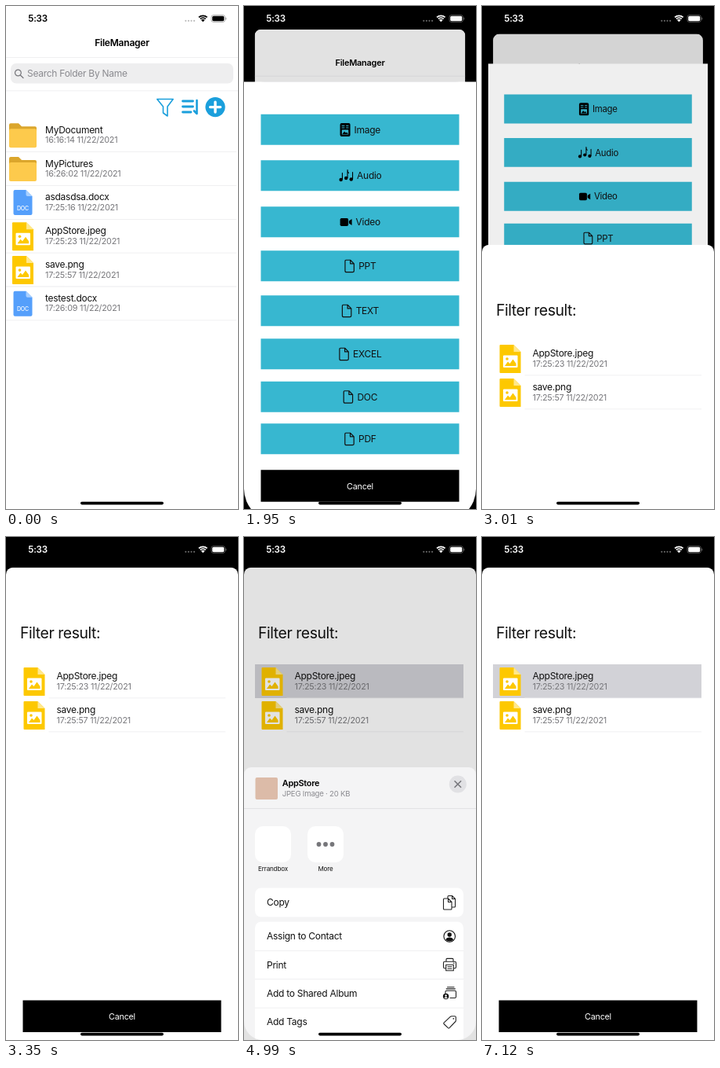
Animation, 296 px wide and 640 px high, one loop 8000 ms. Source, as an HTML page with a canvas:

```html
<!DOCTYPE html>
<html lang="en">
<head>
<meta charset="utf-8">
<title>File manager</title>
<style>
html, body { margin: 0; width: 100%; height: 100%; overflow: hidden; background: #000; }
canvas { display: block; width: 296px; height: 640px; }
</style>
</head>
<body>
<canvas id="stage"></canvas>
<script>
const W = 296, H = 640, LOOP = 8000;
const canvas = document.getElementById('stage');
const dpr = window.devicePixelRatio || 1;
canvas.width = W * dpr;
canvas.height = H * dpr;
const c = canvas.getContext('2d');

// The screen refreshes only at these moments (ms).
const TICKS = [0, 120, 660, 770, 1010, 1130, 1500, 1630, 1750, 1850, 1950, 2050, 2160,
  3010, 3130, 3250, 3350, 4340, 4640, 4760, 4880, 4990, 6680, 6790, 6900, 7010, 7120];
const SCALE = 0.905, SHEET_TOP = 38.7, STACK_TOP = 30.5, SHEET_H = 602, DIM = 0.115;
const INK = '#111', GRAY = '#77777b', BLUE = '#1b9fdc', TEAL = '#37b7d0', LINE = '#ebebed';

const mix = (a, b, p) => a + (b - a) * p;
const ramp = (t, a, b) => Math.min(1, Math.max(0, (t - a) / (b - a)));

// Critically damped spring from 0 to 1.
function spring(t, start) {
  const k = Math.max(0, t - start) * 0.018;
  const p = 1 - (1 + k) * Math.exp(-k);
  return p > 0.995 ? 1 : p;
}

function text(s, x, y, size, color = INK, weight = 400, align = 'left') {
  c.font = `${weight} ${size}px Inter, "Liberation Sans", sans-serif`;
  c.letterSpacing = `${-0.0225 * size}px`;
  c.textAlign = align;
  c.fillStyle = color;
  c.fillText(s, x, y);
}

function box(x, y, w, h, color, r = 0) {
  c.fillStyle = color;
  c.beginPath();
  c.roundRect(x, y, w, h, r);
  c.fill();
}

function disc(x, y, r, color) {
  c.fillStyle = color;
  c.beginPath();
  c.arc(x, y, r, 0, 7);
  c.fill();
}

function at(x, y, draw) {
  c.save();
  c.translate(x, y);
  draw();
  c.restore();
}

function fill(d, color) {
  c.fillStyle = color;
  c.fill(new Path2D(d));
}

function stroke(d, color, width = 1) {
  c.strokeStyle = color;
  c.lineWidth = width;
  c.lineCap = c.lineJoin = 'round';
  c.stroke(new Path2D(d));
}

// ---- file list ----

function folder() {
  fill('M0 3Q0 1 2 1H12L16 5H33Q35 5 35 7V30H0Z', '#dba62c');
  box(0, 8, 35, 24, '#fdca4c', 2);
}

function docFile() {
  fill('M2 0H16L24 8V30Q24 32 22 32H2Q0 32 0 30V2Q0 0 2 0Z', '#559ffb');
  fill('M16 0L24 8H18Q16 8 16 6Z', '#a9d0ff');
  text('DOC', 12, 25.5, 7, '#fff', 500, 'center');
}

function imageFile() {
  fill('M1 0H18L27 9V36H1Q0 36 0 35V1Q0 0 1 0Z', '#fdc800');
  fill('M18 0L27 9H18Z', '#ffe88c');
  box(4.5, 13.5, 18.5, 15.5, '#fff', 1);
  disc(9.5, 18, 1.8, '#fdc800');
  fill('M6.5 27L10.5 21.5L13 24L17 18.5L21 24V27Z', '#fdc800');
}

const ICONS = { dir: [folder, 4, 5.5], doc: [docFile, 9.5, 5.7], img: [imageFile, 8, 4] };

function row(x, y, kind, name, stamp, right, lineX) {
  const [icon, ix, iy] = ICONS[kind];
  at(x, y, () => {
    at(ix, iy, icon);
    text(name, 50, 19, 12);
    text(stamp, 50, 31.5, 10.8, GRAY);
    box(lineX, 42.5, right - x - lineX, 0.8, LINE);
  });
}

const FILES = [
  ['dir', 'MyDocument', '16:16:14 11/22/2021'],
  ['dir', 'MyPictures', '16:26:02 11/22/2021'],
  ['doc', 'asdasdsa.docx', '17:25:16 11/22/2021'],
  ['img', 'AppStore.jpeg', '17:25:23 11/22/2021'],
  ['img', 'save.png', '17:25:57 11/22/2021'],
  ['doc', 'testest.docx', '17:26:09 11/22/2021']
];

function home(caret) {
  text('FileManager', 148, 51.3, 12.1, '#000', 600, 'center');
  box(0, 65, W, 0.8, LINE);
  box(6, 73, 284, 25.5, '#eeeeef', 7);
  stroke('M19.3 85A3.9 3.9 0 1 1 11.5 85A3.9 3.9 0 1 1 19.3 85M18.3 88L22 91.5', '#77777c', 1.2);
  text('Search Folder By Name', 27, 90.2, 12, '#8a8a8f');
  c.globalAlpha = caret;
  box(27, 78, 2, 16, '#3f74f2', 1);
  c.globalAlpha = 1;
  box(0, 107.5, W, 0.8, LINE);
  stroke('M192.8 118.5H213.2L206 128V140L200.5 136V128Z', BLUE, 1.6);
  stroke('M225.5 121H238.5M225.5 128H238.5M225.5 135H236', BLUE, 2.8);
  stroke('M243.5 120V137L240 133.5', BLUE, 2.6);
  disc(267, 128.6, 12.6, BLUE);
  stroke('M260.5 128.6H273.5M267 122.1V135.1', '#fff', 3.4);
  FILES.forEach((f, i) => row(0, 142.7 + 42.85 * i, ...f, 294, 0));
}

// ---- type menu ----

function pictureGlyph() {
  box(0, 0, 13, 17, '#000', 2);
  stroke('M2.5 3.5H5.5M2.5 6H5.5M8 3.5H10.5M8 6H10.5', TEAL, 1);
  box(2.3, 8.5, 8.4, 6, TEAL, 0.5);
  fill('M2.8 14L5.5 10.5L7.5 12.5L8.7 11.5L10.3 14Z', '#000');
}

function notesGlyph() {
  stroke('M4.4 13V5M11 11V1Q11 4 12.5 5M17.5 12.5V4', '#000', 1.1);
  for (const [x, y] of [[2.6, 13.5], [9.2, 11.5], [15.7, 13]]) disc(x, y, 2.2, '#000');
}

function cameraGlyph() {
  box(0, 3.5, 10.5, 10, '#000', 1.8);
  fill('M11.3 7L15 4.5V12.5L11.3 10Z', '#000');
}

function pageGlyph() {
  stroke('M2 .8H7.5L12.2 5.5V14.5Q12.2 16.2 10.5 16.2H2.5Q.8 16.2 .8 14.5V2.5Q.8 .8 2 .8ZM7.5 .8V5.5H12.2', '#111', 1.2);
}

const MENU = [
  ['Image', 137.5, pictureGlyph, 13], ['Audio', 196, notesGlyph, 18],
  ['Video', 255, cameraGlyph, 15], ['PPT', 311, pageGlyph, 13],
  ['TEXT', 368, pageGlyph, 13], ['EXCEL', 423, pageGlyph, 13],
  ['DOC', 477.5, pageGlyph, 13], ['PDF', 531, pageGlyph, 13]
];

function cancelButton(y) {
  box(21.5, y, 253, 40.5, '#000');
  text('Cancel', 148, y + 24.6, 10.8, '#fff', 400, 'center');
}

function menu(off, p) {
  const s = mix(1, SCALE, p);
  c.save();
  c.translate(W / 2 * (1 - s), mix(SHEET_TOP, STACK_TOP, p) + off);
  c.scale(s, s);
  c.translate(0, -SHEET_TOP);
  const r = off > 1 ? 42 : 0;
  c.beginPath();
  c.roundRect(0, 80, W, H - 80, [0, 0, r, r]);
  c.clip();
  box(0, 80, W, H, '#fff');
  c.translate(0, -16);
  for (const [label, y, glyph, gw] of MENU) {
    box(21.5, y, 253, 39, TEAL);
    c.font = '400 12px Inter, "Liberation Sans", sans-serif';
    c.letterSpacing = '-0.27px';
    const x = 148.3 - (gw + 5 + c.measureText(label).width) / 2;
    at(x, y + 11.3, glyph);
    text(label, x + gw + 5, y + 24, 12);
  }
  cancelButton(590);
  box(0, 0, W, H + 20, `rgba(0,0,0,${DIM * p})`);
  c.restore();
}

// ---- results ----

function results(off, picked, dim) {
  c.save();
  c.translate(0, off);
  c.beginPath();
  c.roundRect(0, SHEET_TOP, W, H, [9, 9, 0, 0]);
  c.clip();
  box(0, SHEET_TOP, W, H, '#fff');
  text('Filter result:', 18, 129, 19.4);
  if (picked) box(14, 162, 266, 43, '#d2d2d7');
  row(14.5, 162, ...FILES[3], 280, 40);
  row(14.5, 205, ...FILES[4], 280, 40);
  cancelButton(589.5);
  box(0, 0, W, H, `rgba(0,0,0,${DIM * dim})`);
  c.restore();
}

// ---- share sheet ----

const copyGlyph = () => stroke('M6 3.5V1.5Q6 .5 7 .5H11.5L15.5 4.5V14Q15.5 15 14.5 15H11.5M11.5 .5V4.5H15.5' +
  'M1.5 4H6.5L11 8.5V17Q11 18 10 18H1.5Q.5 18 .5 17V5Q.5 4 1.5 4ZM6.5 4V8.5H11', '#222', 1.1);

function contactGlyph() {
  stroke('M15.5 9A7.3 7.3 0 1 1 .9 9A7.3 7.3 0 1 1 15.5 9', '#111', 1.1);
  disc(8.2, 7, 2.7, '#111');
  fill('M3.3 13.5Q4 10.5 8.2 10.5Q12.4 10.5 13.1 13.5Q8.2 17.5 3.3 13.5Z', '#111');
}

function printGlyph() {
  stroke('M4 5V2.2Q4 1.2 5 1.2H12Q13 1.2 13 2.2V5M3.5 13.5H2Q.5 13.5 .5 12V6.5Q.5 5 2 5H15Q16.5 5 16.5 6.5V12Q16.5 13.5 15 13.5H13.5' +
    'M3.7 9H13.3V16.5H3.7ZM6 11.5H11M6 14H11', '#222', 1.1);
  disc(13.8, 7, 0.8, '#222');
}

function albumGlyph() {
  stroke('M5.5 1.2H14M4.2 3.4H15.3M3 9V7.2Q3 5.8 4.4 5.8H15Q16.5 5.8 16.5 7.2V13.5Q16.5 15 15 15H9', '#222', 1.1);
  disc(3.6, 13, 3.7, '#111');
  disc(3.6, 12, 1.2, '#fff');
  fill('M1.4 15Q3.6 12.5 5.8 15Q3.6 16.7 1.4 15Z', '#fff');
}

function tagGlyph() {
  stroke('M1 10.2L9.5 2.2Q10 1.8 10.8 1.8H15Q16.3 1.8 16.3 3V7.2Q16.3 8 15.8 8.5L8 16.6Q7.2 17.3 6.4 16.6L1 11.5Q.4 10.8 1 10.2Z', '#222', 1.1);
  disc(13.3, 4.8, 0.9, '#222');
}

const ACTIONS = [
  ['Copy', 465, copyGlyph], ['Assign to Contact', 508, contactGlyph], ['Print', 544.2, printGlyph],
  ['Add to Shared Album', 580.5, albumGlyph], ['Add Tags', 617, tagGlyph]
];

function share(off) {
  c.save();
  c.translate(0, off);
  c.beginPath();
  c.roundRect(0, 293, W, H - 293, [9, 9, 24, 24]);
  c.clip();
  box(0, 293, W, H, '#f4f4f5');
  box(14.5, 306, 28.5, 28, '#dcbba8', 2);
  text('AppStore', 48.7, 316.8, 10.9, '#000', 600);
  text('JPEG Image · 20 KB', 48.7, 330, 9.6, '#8b8b90');
  disc(272.8, 314.5, 11, '#e1e1e4');
  stroke('M269 310.7L276.6 318.3M276.6 310.7L269 318.3', '#77777c', 1.6);
  box(0, 345, W, 0.8, '#dcdcdf');
  box(14, 368, 46, 46, '#fff', 10);
  box(81, 368, 46, 46, '#fff', 10);
  for (let i = -1; i < 2; i++) disc(104 + 8.5 * i, 391, 2.9, '#76767a');
  text('Errandbox', 37, 425, 8.1, INK, 400, 'center');
  text('More', 104, 425, 8.1, INK, 400, 'center');
  box(14, 446.5, 266, 37, '#fff', 8);
  box(14, 489.5, 266, 170, '#fff', 8);
  ACTIONS.forEach(([label, y, glyph], i) => {
    text(label, 29, y + 4.3, 12);
    at(254, y - 9, glyph);
    if (i > 1) box(14, y - 18.3, 266, 0.8, LINE);
  });
  c.restore();
}

// ---- system overlay ----

function statusBar(p) {
  const v = Math.round(255 * p), ink = `rgb(${v},${v},${v})`;
  text('5:33', 28.3, 20.3, 11.6, ink, 600);
  for (let i = 0; i < 4; i++) disc(229.3 + 3.6 * i, 18.8, 1.1, p > 0.5 ? '#666' : '#bbb');
  c.strokeStyle = ink;
  c.lineCap = 'butt';
  c.lineWidth = 1.7;
  for (const r of [7.7, 5]) {
    c.beginPath();
    c.arc(251.3, 20, r, -2.33, -0.81);
    c.stroke();
  }
  fill('M251.3 20.3L248.9 17.7Q251.3 15.9 253.7 17.7Z', ink);
  c.globalAlpha = 0.4;
  c.lineWidth = 0.8;
  c.beginPath();
  c.roundRect(262, 11.6, 17.4, 8.8, 2.6);
  c.stroke();
  box(280.3, 14.5, 1, 3, ink, 0.5);
  c.globalAlpha = 1;
  box(263.2, 12.8, 15, 6.4, ink, 1.6);
}

function draw(t) {
  const p1 = spring(t, 1645);
  const p2 = spring(t, 2905.7);
  const p3 = spring(t, 4535) - spring(t, 6575);
  const caret = ramp(t, 0, 120) - ramp(t, 600, 770) + ramp(t, 950, 1130) - ramp(t, 1440, 1630);

  c.setTransform(dpr, 0, 0, dpr, 0, 0);
  box(0, 0, W, H, '#000');

  const s = mix(1, SCALE, p1);
  c.save();
  c.translate(W / 2 * (1 - s), STACK_TOP * p1 + 9 * p2);
  c.scale(s, s);
  c.beginPath();
  c.roundRect(0, 0, W, H, 9 * p1);
  c.clip();
  box(0, 0, W, H, '#fff');
  home(caret);
  box(0, 0, W, H, `rgba(0,0,0,${DIM * p1})`);
  box(0, 0, W, H, `rgba(0,0,0,${DIM * p2})`);
  c.restore();

  if (p1 > 0) menu(SHEET_H * (1 - p1), p2);
  if (p2 > 0) results(SHEET_H * (1 - p2), t >= 4340, p3);
  if (p3 > 0) share(347 * (1 - p3));
  statusBar(p1);
  box(95, 630.8, 106, 3.6, '#000', 1.8);
}

const began = performance.now();
function frame() {
  const t = (performance.now() - began) % LOOP;
  draw(TICKS.findLast(k => k <= t));
  requestAnimationFrame(frame);
}
frame();
</script>
</body>
</html>
```
